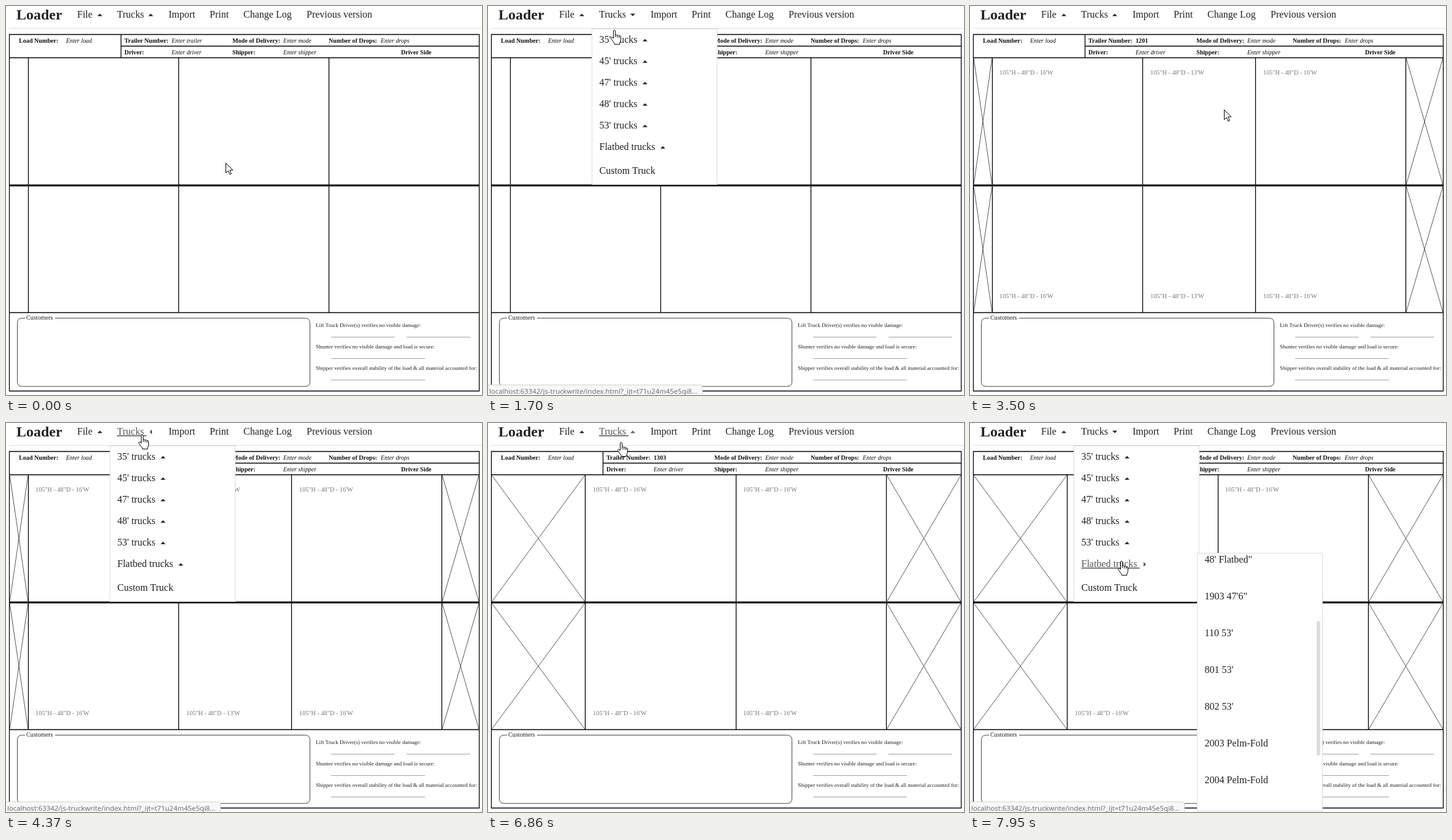
These frames come from a looping animation (776x635 px, 8 s). An HTML page:

```html
<!DOCTYPE html>
<html lang="en">
<head>
<meta charset="utf-8">
<title>Loader</title>
<style>
html, body { margin: 0; width: 100%; height: 100%; overflow: hidden; background: #fff; }
svg { display: block; width: 776px; height: 635px; font: 16px "Liberation Serif", serif; fill: #212121; }
.title { font-weight: bold; font-size: 24px; }
.label { font-weight: bold; font-size: 10.15px; fill: #111; }
.field { font-style: italic; font-size: 9.9px; fill: #111; }
.legend { font-size: 10.2px; }
.note { font-size: 9px; }
.size { font-size: 10.25px; fill: #777; }
.status { font: 11.4px "Open Sans", sans-serif; fill: #666; }
.hover { fill: #5a5a5a; }
.under { text-decoration: underline; }
.rule { stroke: #000; stroke-width: 1.3; fill: none; }
.cross { stroke: #555; fill: none; }
.panel { fill: #fff; stroke: #dcdcdc; }
.cursor { fill: #fff; stroke: #000; stroke-linejoin: round; }
</style>
</head>
<body>
<svg id="stage" viewBox="0 0 776 635"></svg>
<script>
const LOOP = 8000;
const stage = document.getElementById('stage');

// Pointer hot spot: time, x, y
const pointerKeys = [
  [530, 358, 256], [1230, 212, 17], [1350, 212, 17], [1500, 207, 4], [1700, 206, 39],
  [2100, 232, 164], [2560, 232, 164], [2880, 427, 162], [3030, 427, 162], [3500, 414, 169],
  [3670, 414, 169], [4230, 222, 19], [4400, 222, 19], [4740, 212, 51], [5080, 212, 51],
  [5600, 406, 118], [5770, 408, 118], [5930, 408, 118], [6080, 402, 122], [6390, 402, 122],
  [6860, 217, 31], [7130, 216, 20], [7240, 216, 20], [7920, 247, 225]
];

const menuTimes = [[1430, 3030], [4370, 5930], [7240, LOOP]];
const statusTimes = [[1430, 3080], [4370, 5770], [7180, LOOP]];

const rows = ["35' trucks", "45' trucks", "47' trucks", "48' trucks", "53' trucks", 'Flatbed trucks', 'Custom Truck']
  .map((name, i) => ({ name, y: i < 6 ? 55 + 35 * i : 269, arrow: i < 5 ? 256 : i === 5 ? 285 : 0 }));

const submenus = [
  { row: 3, times: [2090, 3030], top: 142, height: 421, first: 173,
    items: ['1201', '1501', '1102 Offset', '1601 Offset', '1602 Offset', '1604 Offset', '1902 Offset'] },
  { row: 0, times: [4600, 5930], top: 37, height: 181, first: 68, items: ['9002', '1303', '1603 Offset'] },
  { row: 5, times: [7850, LOOP], top: 212, height: 421, first: 223, thumb: 323,
    items: ["48' Flatbed\"", "1903 47'6\"", "110 53'", "801 53'", "802 53'", '2003 Pelm-Fold', '2004 Pelm-Fold'] }
];

const trailers = [
  { from: 0, columns: [36, 281, 526], crosses: [], sizes: [] },
  { from: 3030, number: '1201', columns: [36, 281, 465, 710], crosses: [[6, 36], [711, 771]], sizes: [[48, 16], [294, 13], [478, 16]] },
  { from: 5930, number: '1303', columns: [158, 404, 649], crosses: [[6, 158], [650, 771]], sizes: [[171, 16], [416, 16]] }
];

const clamp = v => Math.max(0, Math.min(1, v));
const within = (t, [from, to]) => t >= from && t < to;
const text = (x, y, str, cls = '') => `<text x="${x}" y="${y}" class="${cls}">${str}</text>`;
const path = (d, cls) => `<path d="${d}" class="${cls}"/>`;
const panel = (x, y, w, h) => `<rect x="${x}.5" y="${y}.5" width="${w}" height="${h}" class="panel"/>`;
const arrow = (x, y, angle = 0, cls = '') =>
  `<path d="M-4 2L0-2L4 2Z" transform="translate(${x} ${y}) rotate(${angle.toFixed(1)})" class="${cls}"/>`;
// How far an arrow has turned: starts just before opening, turns back on closing
const turn = (t, [open, close]) => clamp((t - open + 90) / 180) - clamp((t - close) / 180);

function pointerAt(t) {
  const next = pointerKeys.findIndex(k => k[0] > t);
  if (next === 0) return pointerKeys[0].slice(1);
  if (next < 0) return pointerKeys.at(-1).slice(1);
  const [a, b] = [pointerKeys[next - 1], pointerKeys[next]];
  const p = (t - a[0]) / (b[0] - a[0]), s = p * p * (3 - 2 * p);
  return [1, 2].map(i => a[i] + (b[i] - a[i]) * s);
}

function drawForm(trailer) {
  let out = path('M5.5 46.5H771.5V628.5H5.5ZM187.5 46.5V84.5M187.5 65.5H771.5M5.5 84.5H771.5M5.5 500.5H771.5', 'rule');
  for (const x of trailer.columns) out += path(`M${x}.5 84.5V500.5`, 'rule');
  for (const [l, r] of trailer.crosses)
    for (const [top, bottom] of [[85, 292], [294, 500]])
      out += path(`M${l} ${top}L${r} ${bottom}M${r} ${top}L${l} ${bottom}`, 'cross');
  out += '<rect x="5" y="291.4" width="767" height="3" fill="#000"/>';
  for (const [x, feet] of trailer.sizes)
    for (const y of [112, 477]) out += text(x, y, `105"H - 48"D - ${feet}'W`, 'size');

  const labels = [[21, 60, 'Load Number:'], [193, 60, 'Trailer Number:'], [369, 60, 'Mode of Delivery:'],
    [526, 60, 'Number of Drops:'], [193, 79, 'Driver:'], [369, 79, 'Shipper:'], [644, 79, 'Driver Side']];
  const fields = [[98, 60, 'load'], [452, 60, 'mode'], [611, 60, 'drops'], [270, 79, 'driver'], [452, 79, 'shipper']];
  for (const [x, y, s] of labels) out += text(x, y, s, 'label');
  for (const [x, y, s] of fields) out += text(x, y, 'Enter ' + s, 'field');
  out += trailer.number ? text(270, 60, trailer.number, 'label') : text(270, 60, 'Enter trailer', 'field');

  out += '<path d="M31 509.5H26.5Q18.5 509.5 18.5 517.5V613Q18.5 621 26.5 621H487.5Q495.5 621 495.5 613V517.5Q495.5 509.5 487.5 509.5H80" fill="none" stroke="#444"/>';
  out += text(33, 512, 'Customers', 'legend');
  const notes = ['Lift Truck Driver(s) verifies no visible damage:', 'Shunter verifies no visible damage and load is secure:',
    'Shipper verifies overall stability of the load &amp; all material accounted for:'];
  notes.forEach((s, i) => {
    const y = 524 + 35 * i;
    out += text(505, y, s, 'note') + text(530, y + 16, '_'.repeat(i ? 34 : 23), 'note');
  });
  return out + text(653, 540, '_'.repeat(23), 'note');
}

function drawNav(t, x, y) {
  const menuOpen = menuTimes.some(m => within(t, m));
  const overTrucks = x > 172 && x < 245 && y < 36;
  let out = '<path d="M5 36.5H776" stroke="#ddd"/>' + text(17, 22, 'Loader', 'title');
  for (const [left, name] of [[116, 'File'], [265, 'Import'], [332, 'Print'], [387, 'Change Log'], [490, 'Previous version']])
    out += text(left, 19, name);
  out += arrow(153, 14.6);
  const angle = -180 * menuTimes.reduce((sum, m) => sum + turn(t, m), 0);
  out += text(181, 19, 'Trucks\u00a0', overTrucks ? 'hover under' : '') + arrow(236, 14.6, angle, overTrucks ? 'hover' : '');
  if (!menuOpen) return out;

  out += panel(169, 37, 204, 254);
  rows.forEach((row, i) => {
    const sub = submenus.find(s => s.row === i && within(t, s.times));
    const over = x > 170 && x < 275 && Math.abs(y - row.y) < 13;
    const cls = (over ? 'hover ' : '') + (over || sub ? 'under' : '');
    out += text(181.5, row.y + 5, row.name + (row.arrow ? '\u00a0' : ''), cls);
    if (row.arrow) out += arrow(row.arrow, row.y + .8, sub ? 90 * turn(t, sub.times) : 0, cls);
  });

  for (const sub of submenus.filter(s => within(t, s.times))) {
    out += panel(370, sub.top, 204, sub.height);
    sub.items.forEach((item, i) => {
      const cy = sub.first + 60 * i;
      const over = x > 371 && Math.abs(y - cy) < 30;
      out += text(382.5, cy + 5, item, over ? 'hover under' : '');
    });
    if (sub.thumb) out += `<rect x="565" y="${sub.thumb}" width="6" height="220" rx="3" fill="#ddd"/>`;
  }
  return out;
}

function drawStatus() {
  return '<path d="M-1 618.5H346Q349.5 618.5 349.5 622V636H-1Z" fill="#f7f7f7" stroke="#d4d4d4"/>' +
    text(2, 633, 'localhost:63342/js-truckwrite/index.html?_ijt=t71u24m45e5qi8...', 'status');
}

function drawCursor(t, x, y) {
  const menuOpen = menuTimes.some(m => within(t, m));
  const hand = x > 172 && x < 275 && y < (menuOpen ? 282 : 36);
  const shape = hand
    ? 'M-1.5 1.5Q0-.8 1.7 1.5V8.5Q3.5 7 4.8 9Q6.5 7.8 7.8 9.8Q10.3 9 10.5 12V16.5Q10.3 19 8.8 21V23.5H.2V21.8L-5.2 14.5Q-6.2 12.5-4.5 12Q-3 11.8-1.5 13.8ZM1.7 8.5V12M4.8 9V12.5M7.8 9.8V13'
    : 'M.5.5V16.5L4.2 13L6.8 19L9.3 18L6.7 12H11.8Z';
  return `<g transform="translate(${x.toFixed(1)} ${y.toFixed(1)})">${path(shape, 'cursor')}</g>`;
}

let shown = '';
function frame() {
  const t = performance.now() % LOOP;
  const [x, y] = pointerAt(t);
  const trailer = trailers.findLast(l => t >= l.from);
  const markup = drawForm(trailer) + drawNav(t, x, y) +
    (statusTimes.some(s => within(t, s)) ? drawStatus() : '') + drawCursor(t, x, y);
  if (markup !== shown) stage.innerHTML = shown = markup;
  requestAnimationFrame(frame);
}
frame();
</script>
</body>
</html>
```
